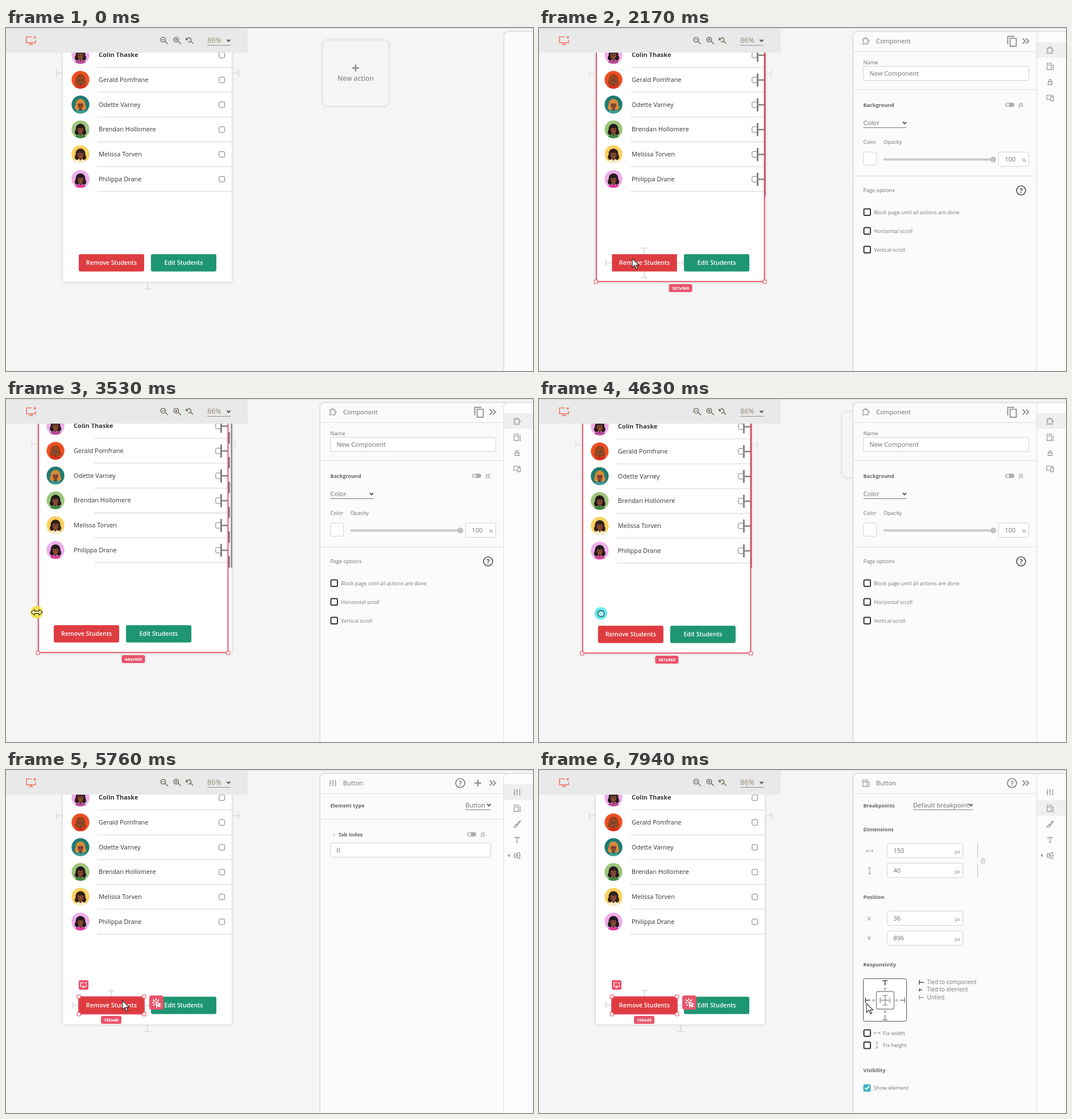
An HTML page with a canvas for the animation above (7.99 s loop, 927 by 604 pixels).

```html
<!DOCTYPE html>
<html lang="en">
<head>
<meta charset="utf-8">
<style>
  html, body { margin: 0; width: 100%; height: 100%; overflow: hidden; background: #f5f5f5; }
  canvas { display: block; }
</style>
</head>
<body>
<canvas id="stage" width="927" height="604"></canvas>
<script>
const ctx = document.getElementById('stage').getContext('2d');
const LOOP = 7990;
const RED = '#e4495d', TIE = '#dcdcdc', INK = '#6d6d6d', PANEL = '#fbfbfb';

const TIMES = { select: 1350, slide: 1368, resize: 3000, release: 3720, undo: 4300,
                grab: 4430, drop: 4900, button: 5680, layout: 6960 };

const ROWS = [
  ['Colin Thaske', '#efade9', '#2b1b20', '#b84c98'],
  ['Gerald Pomfrane', '#f04f24', '#9a451d', '#d5331d'],
  ['Odette Varney', '#1f7b71', '#d88a3b', '#3c9a90'],
  ['Brendan Hollomere', '#9cc57c', '#241a1c', '#3f8740'],
  ['Melissa Torven', '#fdd160', '#33201c', '#f7eccb'],
  ['Philippa Drane', '#efade9', '#241a20', '#dd3f9b'],
];

// Paths in a 24 x 24 box
const ICONS = {
  puzzle: 'M9 5a2.5 2.5 0 1 1 4 0h5v5a2.5 2.5 0 1 1 0 4v7h-5a2.5 2.5 0 1 0-5 0H3v-6a2.5 2.5 0 1 0 0-5V5z',
  layout: 'M3 3h13M3 1v4M16 1v4M3 8h13v14H3zM21 8v14M19 8h4M19 22h4',
  lock: 'M5 11h14v10H5zM8 11V7a4 4 0 0 1 8 0v4M12 15v2',
  devices: 'M20 8V4H2v13h11M14 9h8v12h-8z',
  sliders: 'M4 2v9M4 15v7M1 13h6M12 2v4M12 10v12M9 8h6M20 2v11M20 17v5M17 15h6',
  brush: 'M21 2L10 13l3 3L22 4zM9 14c-5 0-3 6-7 7 4 2 10 1 10-4z',
  type: 'M4 7V4h16v3M12 4v17M9 21h6',
  align: 'M1 12h3M4 6h6v12H4zM14 3h6v18h-6zM10 12h4M20 12h3',
  zoomOut: 'M15 10a6 6 0 1 1-12 0 6 6 0 0 1 12 0zM14 14l7 7M6 10h6',
  zoomIn: 'M15 10a6 6 0 1 1-12 0 6 6 0 0 1 12 0zM14 14l7 7M6 10h6M9 7v6',
  zoomReset: 'M2 4v6h6M4 9a6 6 0 1 1 4 7M15 14l7 7',
  monitor: 'M14 4H2v13h20V11M12 17v4M7 21h10M19 5a1.5 1.5 0 1 0 3 0 1.5 1.5 0 1 0-3 0',
  chevrons: 'M4 5l7 7-7 7M13 5l7 7-7 7',
  copy: 'M8 6h13v17H8zM3 19V2h14',
  plus: 'M12 3v18M3 12h18',
  click: 'M11 2v5M4 5l4 4M18 5l-4 4M2 12h5M5 19l3-3M11 11l10 4-4 2 4 4-2 1-4-4-2 4z',
};
const ARROW = new Path2D('M0 0v16l4-4 3 6.500 2.500-1-3-6h5z');
const SPREAD = new Path2D('M-10 0l6-5v3h8v-3l6 5-6 5v-3h-8v3z');
const FIST = new Path2D('M-5 2c-2-4 0-5 1-4 0-3 2-3 3-2 1-2 3-1 3 0 2-1 3 0 3 2 2 0 1 3 0 5-1 4-8 4-10-1z');

// time, x, y of the pointer
const POINTER = [
  [70, 786, 606], [450, 200, 416], [600, 25, 396], [830, 106, 392], [870, 106, 392],
  [1250, 104, 376], [1540, 104, 376], [1600, 101, 384], [1930, 101, 384], [2140, 164, 406],
  [2340, 164, 406], [2550, 107, 384], [2720, 107, 384], [2800, 101, 384], [3050, 98, 384],
  [3620, 51, 375], [4190, 51, 375], [4400, 86, 378], [4430, 86, 378], [4840, 133, 377],
  [5000, 133, 377], [5480, 205, 406], [6010, 205, 406], [6640, 874, 68], [6820, 874, 68],
  [6900, 899, 70], [7000, 899, 70], [7590, 582, 372], [7620, 582, 372], [7930, 576, 411],
];

const within = (t, from, to) => t >= from && t < to;
function ease(t, from, to) {
  const u = Math.min(1, Math.max(0, (t - from) / (to - from)));
  return u * u * (3 - 2 * u);
}
function pointerAt(t) {
  let [, x, y] = POINTER[0];
  for (let i = 1; i < POINTER.length; i++) {
    const u = ease(t, POINTER[i - 1][0], POINTER[i][0]);
    x += (POINTER[i][1] - POINTER[i - 1][1]) * u;
    y += (POINTER[i][2] - POINTER[i - 1][2]) * u;
  }
  return [x, y];
}

function text(s, x, y, size = 9, color = INK, weight = 400, align = 'left') {
  ctx.font = `${weight} ${size}px "Open Sans", "Noto Sans", sans-serif`;
  ctx.fillStyle = color;
  ctx.textAlign = align;
  ctx.fillText(s, x, y);
}
function box(x, y, w, h, { fill, stroke, r = 0, lw = 1, shadow = 0 } = {}) {
  ctx.beginPath();
  ctx.roundRect(x, y, w, h, r);
  if (fill) {
    ctx.shadowColor = 'rgba(0,0,0,.2)';
    ctx.shadowBlur = shadow;
    ctx.fillStyle = fill;
    ctx.fill();
    ctx.shadowBlur = 0;
  }
  if (stroke) { ctx.strokeStyle = stroke; ctx.lineWidth = lw; ctx.stroke(); }
}
function line(x1, y1, x2, y2, color = '#dedede', lw = 1) {
  ctx.beginPath();
  ctx.moveTo(x1, y1);
  ctx.lineTo(x2, y2);
  ctx.strokeStyle = color;
  ctx.lineWidth = lw;
  ctx.stroke();
}
function disc(x, y, r, color) {
  ctx.beginPath();
  ctx.arc(x, y, r, 0, 7);
  ctx.fillStyle = color;
  ctx.fill();
}
function ellipse(x, y, rx, ry, color) {
  ctx.beginPath();
  ctx.ellipse(x, y, rx, ry, 0, 0, 7);
  ctx.fillStyle = color;
  ctx.fill();
}
function icon(name, x, y, size = 14, color = '#8c8c8c', lw = 1.1) {
  ctx.save();
  ctx.translate(x - size / 2, y - size / 2);
  ctx.scale(size / 24, size / 24);
  ctx.strokeStyle = color;
  ctx.lineWidth = lw * 24 / size;
  ctx.stroke(new Path2D(ICONS[name]));
  ctx.restore();
}
// A line leaving (x, y) along (dx, dy) with a crossbar at its far end
function tie(x, y, dx, dy, len = 11, half = 5.5, color = TIE, lw = 2) {
  const ex = x + dx * len, ey = y + dy * len;
  line(x, y, ex, ey, color, lw);
  line(ex - dy * half, ey - dx * half, ex + dy * half, ey + dx * half, color, lw);
}
function caret(x, y, color = '#555') {
  ctx.beginPath();
  ctx.moveTo(x - 3, y - 1.5);
  ctx.lineTo(x, y + 1.5);
  ctx.lineTo(x + 3, y - 1.5);
  ctx.strokeStyle = color;
  ctx.lineWidth = 2;
  ctx.stroke();
}
function help(x, y, color = '#808080') {
  ctx.beginPath();
  ctx.arc(x, y, 8, 0, 7);
  ctx.strokeStyle = color;
  ctx.lineWidth = 1.7;
  ctx.stroke();
  text('?', x, y + 4.5, 12, color, 700, 'center');
}
function handle(x, y) {
  box(x - 3, y - 3, 6, 6, { fill: '#fff', stroke: RED });
}
function badge(s, x, y, w) {
  box(x - w / 2, y, w, 14, { fill: '#e8546b', r: 3 });
  text(s, x, y + 10, 7.5, '#fff', 700, 'center');
}

function avatar(x, y, [, back, hair, shirt]) {
  ctx.save();
  ctx.beginPath();
  ctx.arc(x, y, 15.7, 0, 7);
  ctx.clip();
  box(x - 16, y - 16, 32, 32, { fill: back });
  ellipse(x, y - 1, 8.5, 9, hair);
  ellipse(x - 6, y + 5, 4, 5, hair);
  ellipse(x + 6, y + 5, 4, 5, hair);
  ellipse(x, y + 15, 11, 6, shirt);
  box(x - 2, y + 5, 4, 6, { fill: '#6f3a26', r: 2 });
  ellipse(x, y + 1, 5, 6.5, '#8a4b30');
  ellipse(x, y - 5, 6, 3, hair);
  disc(x - 2, y + 1, .8, '#23110d');
  disc(x + 2, y + 1, .8, '#23110d');
  ctx.restore();
}

function component(t, [px, py]) {
  const resized = within(t, TIMES.resize, TIMES.undo);
  const selected = within(t, TIMES.select, TIMES.button);
  const stretch = ease(t, 3050, 3620);
  const left = t < TIMES.undo ? 100 - 47 * stretch : 53 + 47 * ease(t, 4430, 4840);
  const right = resized ? 397 - 6.400 * stretch : left + 297;
  const dx = left - 100, rx = right - 397;

  ctx.save();
  ctx.translate(0, t >= TIMES.grab ? 1 : 0);

  const cardX = t >= TIMES.undo ? dx : 0;
  box(557.5 + cardX, 22, 115.5, 115, { fill: '#f5f5f5', stroke: '#ebebeb', r: 7, shadow: 5 });
  icon('plus', 615 + cardX, 70.5, 16, '#8f8f96', 2.6);
  text('New action', 615 + cardX, 93, 11.8, '#8f8f96', 600, 'center');

  box(left, -20, (resized ? 397 : right) - left, 467, { fill: '#fff', shadow: 5 });
  const tieColor = selected ? '#e4e4e4' : TIE;
  tie(left, 79.5, -1, 0, 11, 6, tieColor);
  tie(right + 1, 79.5, 1, 0, 11, 6, tieColor);
  if (!selected) tie(249 + dx, 448, 0, 1, 11.5, 6);

  ROWS.forEach((row, i) => {
    const y = 47.4 + 43.7 * i;
    avatar(131 + dx, y, row);
    text(row[0], 163 + dx, y + 3.800, 11, '#333', i ? 500 : 700);
    box(374.8 + rx, y - 4.6, 9.800, 9.800, { fill: '#fff', stroke: '#777', r: 2 });
    line(161 + rx, y + 22, right, y + 22, '#e6e6e6', 1.8);
    if (!selected) return;
    line(384.5 + rx, y - 11, 384.5 + rx, y + 12, '#828282', 3);
    line(384 + rx, y + .5, right, y + .5, '#828282', 2.5);
    if (resized) line(right + 1.5, y + 11, right + 1.5, y + 31, '#858585', 3);
  });
  if (selected) line(resized ? 396.7 : right + .5, 40, resized ? 396.7 : right + .5, 297, resized ? '#8b8b8b' : '#b5606b', 2.5);

  const bx = 128 + dx;
  const chosen = t >= TIMES.button;
  const hover = !chosen && !within(t, 1600, 1930) && px > bx && px < bx + 115 && py > 398 && py < 429;
  box(bx, 398.3, 115, 30.5, { fill: '#de3c40', r: hover || chosen ? 0 : 3 });
  box(255 + dx, 398.3, 115, 30.5, { fill: '#1e9672', r: 3 });
  if (hover || chosen) {
    tie(bx + 57.5, 398, 0, -1, 10.5, 5.5);
    tie(bx, 413.5, -1, 0, 10.5, 5.5);
    tie(bx + 115, 413.5, 1, 0, 10.5, 5.5);
    if (hover) {
      tie(bx + 57.5, 429, 0, 1, 10.5, 5.5);
      box(bx + .5, 398.5, 114, 30, { stroke: '#e9767d' });
    }
  }
  text('Remove Students', bx + 57.5, 417, 10.6, '#fff', 600, 'center');
  text('Edit Students', 312.5 + dx, 417, 10.6, '#fff', 600, 'center');

  if (selected) {
    box(left + 1, -20, right - left - 1.5, 466.4, { stroke: RED, lw: 1.8 });
    handle(left, 447);
    handle(right, 447);
    const width = resized ? Math.round(387 + 61 * stretch) : 387;
    badge(width + 'x960', (left + right) / 2 + .5, 451, 41);
  }
  if (chosen) {
    box(bx, 398.5, 115, 30, { stroke: RED, lw: 2 });
    for (const x of [128, 243]) for (const y of [398, 429]) handle(x, y);
    badge('150x40', 185, 432, 36);
    box(128, 369, 17, 17, { fill: '#e8546b', r: 3 });
    icon('monitor', 136.5, 377.5, 12, '#fff', 1.2);
    box(252, 396, 25, 25, { fill: '#e8546b', r: 4 });
    icon('click', 264.5, 408.5, 18, '#fff', 1.8);
  }
  ctx.restore();
}

function toolbar() {
  box(0, 0, 425, 43.5, { fill: '#e9e9e9' });
  line(0, .5, 927, .5, '#d6d6d6');
  icon('monitor', 44, 22, 19, '#ef6a55', 1.4);
  icon('zoomOut', 278.5, 22, 17, '#6a6253', 1.4);
  icon('zoomIn', 301.5, 22, 17, '#6a6253', 1.4);
  icon('zoomReset', 323, 22, 15, '#6a6253', 1.4);
  text('86%', 354, 25.5, 12.5, '#94866f');
  caret(391.5, 22);
  line(354, 30.5, 395, 30.5, '#8d8d8d');
}

const bold = (s, x, y) => text(s, x, y, 9.1, '#666', 700);
function input(x, y, w, value, unit) {
  box(x + .5, y + .5, w - 1, 25, { fill: '#fff', stroke: '#d3d3d3', r: 2 });
  text(value, x + 11.5, y + 16.5, 11, INK);
  if (unit) text(unit, x + w - 5, y + 17.5, 9, '#8d8d8d', 400, 'right');
}
function toggle(x, y) {
  box(x, y - 3.5, 16, 7.5, { fill: '#aaa', r: 4 });
  disc(x + 4.5, y + .2, 3, '#e8e8e8');
  text('JS', x + 24, y + 4, 9.5, INK, 500);
}
function checkbox(y) {
  box(571.5, y - 5.5, 11.5, 11.5, { fill: '#fff', stroke: '#333', r: 2, lw: 2 });
}
function select(s, x, y, w, size = 11.3) {
  text(s, x, y, size, INK);
  line(x, y + 4.5, x + w, y + 4.5, '#777');
  caret(x + w - 3.5, y - 4);
}
function header(iconName, title) {
  icon(iconName, 575, 23, 14);
  text(title, 593, 27, 11, INK, 500);
  icon('chevrons', 856, 23, 16, '#888', 1.8);
  line(553, 41.5, 876, 41.5);
}

function componentPanel() {
  header('puzzle', 'Component');
  icon('copy', 832, 23, 20, '#888', 1.7);
  text('Name', 570.5, 64, 9.3, INK, 500);
  input(570, 67, 292, 'New Component');
  line(553, 108.5, 876, 108.5);
  bold('Background', 570.5, 139);
  toggle(820, 135);
  select('Color', 570.5, 171, 76);
  text('Color', 570.5, 204, 9.1, INK, 500);
  text('Opacity', 606, 204, 9.1, INK, 500);
  box(570.5, 218.5, 23, 23, { fill: '#fff', stroke: '#d3d3d3', r: 2 });
  line(606, 231.5, 799, 231.5, '#cbcbcb', 4);
  disc(799, 231.5, 5.3, '#c4c4c4');
  input(808, 218, 54, '100', '%');
  line(553, 260.5, 876, 260.5);
  text('Page options', 570.5, 289, 9.1, INK, 500);
  help(848, 286, '#555');
  ['Block page until all actions are done', 'Horizontal scroll', 'Vertical scroll'].forEach((s, i) => {
    checkbox(324 + 33 * i);
    text(s, 589, 327.5 + 33 * i, 9, '#777', 500);
  });
}

function buttonPanel() {
  header('sliders', 'Button');
  help(799, 23);
  icon('plus', 830, 23, 16, '#888', 2);
  bold('Element type', 570.5, 65.5);
  select('Button', 808, 65.5, 45, 11);
  line(553, 86.5, 876, 86.5);
  text('x', 574.5, 116.5, 9, '#b5b5b5');
  bold('Tab Index', 584.5, 116.5);
  toggle(811, 113);
  input(570, 128, 283, '0');
}

function layoutPanel() {
  header('layout', 'Button');
  help(832, 23);
  bold('Breakpoints', 570.5, 65.5);
  select('Default breakpoint', 658, 65.5, 105);
  bold('Dimensions', 570.5, 107.5);
  input(612, 129, 134, '150', 'px');
  input(612, 164, 134, '40', 'px');
  for (const d of [-1, 1]) {
    tie(581.5, 142.5, d, 0, 5, 2.5, '#999', 1);
    tie(581.5, 177.5, 0, d, 5, 2.5, '#999', 1);
  }
  line(771.5, 129, 771.5, 154, '#bbb');
  line(771.5, 165, 771.5, 189, '#bbb');
  icon('lock', 781, 159.5, 11, '#c0c0c0', 1.2);
  bold('Position', 570.5, 226.5);
  text('X', 578, 264.5, 9.5, INK, 500);
  text('Y', 578, 299.5, 9.5, INK, 500);
  input(612, 248, 134, '36', 'px');
  input(612, 283, 134, '896', 'px');

  bold('Responsivity', 570.5, 345.5);
  box(570.5, 367.5, 76, 75, { fill: '#fff', stroke: '#555', r: 3 });
  box(593.5, 390, 31, 31, { stroke: '#8a8a8a', r: 3, lw: 1.4 });
  [[-1, 0], [0, -1], [1, 0], [0, 1]].forEach(([dx, dy], i) => {
    const from = d => [608.7 + dx * d, 405.4 + dy * d, dx, dy];
    tie(...from(26), 8.5, 4.5, i < 2 ? '#444' : '#858585', 1.5);
    tie(...from(17), 4, 2.5, '#999', 1.3);
    tie(...from(0), 8.5, 4.5, '#999', 1.5);
  });
  ['Tied to component', 'Tied to element', 'Untied'].forEach((s, i) => {
    const y = 373.5 + 13.3 * i;
    tie(i === 1 ? 674 : 677, y + .5, -1, 0, i === 1 ? 5 : 8, i === 1 ? 2.5 : 4, i < 2 ? '#444' : '#999', 1.4);
    text(s, 682.5, y + 3.5, 9.9, '#777');
  });
  checkbox(463);
  checkbox(484.5);
  for (const d of [-1, 1]) {
    tie(594.5, 463, d, 0, 5, 2.5, '#999', 1);
    tie(594.5, 484.5, 0, d, 5, 2.5, '#999', 1);
  }
  text('Fix width', 605, 466.5, 9.3, '#777', 500);
  text('Fix height', 605, 488, 9.3, '#777', 500);

  bold('Visibility', 570.5, 531.5);
  box(570.5, 553.5, 13, 13, { fill: '#41b4c1', r: 2 });
  line(573.5, 560, 576, 562.5, '#fff', 1.8);
  line(575.5, 562.5, 581, 557, '#fff', 1.8);
  text('Show element', 588.5, 563, 9.3, '#777', 500);
}

function panels(t) {
  const open = t >= TIMES.slide;
  const x = 876 - 323.5 * ease(t, TIMES.slide, 1588);
  box(x, 6.5, 400, 620, { fill: PANEL, stroke: '#d9d9d9', r: [7, 0, 0, 0], shadow: 3 });
  if (!open) return;

  ctx.save();
  ctx.translate(x - 552.5, 0);
  (t < TIMES.button ? componentPanel : t < TIMES.layout ? buttonPanel : layoutPanel)();
  ctx.restore();

  box(875.5, 6.5, 60, 620, { fill: '#fcfcfc', stroke: '#dcdcdc', r: [6, 0, 0, 0] });
  box(876, t < TIMES.layout ? 25 : 53, 51, 27.5, { fill: '#efefef' });
  const tabs = t < TIMES.button ? ['puzzle', 'layout', 'lock', 'devices']
                                : ['sliders', 'layout', 'brush', 'type', 'align'];
  tabs.forEach((name, i) => icon(name, 899, 39.5 + 27.8 * i, name === 'lock' || name === 'type' ? 12 : 14));
  if (tabs.length > 4) {
    ctx.fillStyle = '#999';
    ctx.fill(new Path2D('M882 150.500l4-3v6z'));
  }
}

function pointer(t, [x, y]) {
  if (t < 70) return;
  const grabbing = within(t, TIMES.grab, TIMES.drop);
  const spreading = within(t, 1600, 1930) || within(t, 2720, 4190);
  if (grabbing) disc(x, y, 11, '#66e9f0');
  if (within(t, TIMES.resize, TIMES.release)) disc(x, y, 11, '#f3e04e');
  ctx.save();
  ctx.translate(x, y);
  const shape = grabbing ? FIST : spreading ? SPREAD : ARROW;
  ctx.fillStyle = grabbing ? '#a6f5f8' : within(t, TIMES.resize, TIMES.release) ? '#f8ee9a' : '#fff';
  ctx.strokeStyle = '#2b2b2b';
  ctx.lineWidth = 1.1;
  ctx.fill(shape);
  ctx.stroke(shape);
  ctx.restore();
}

function frame(now) {
  const t = now % LOOP;
  const at = pointerAt(t);
  box(0, 0, 927, 604, { fill: '#f5f5f5' });
  component(t, at);
  toolbar();
  panels(t);
  pointer(t, at);
  requestAnimationFrame(frame);
}
requestAnimationFrame(frame);
</script>
</body>
</html>
```
